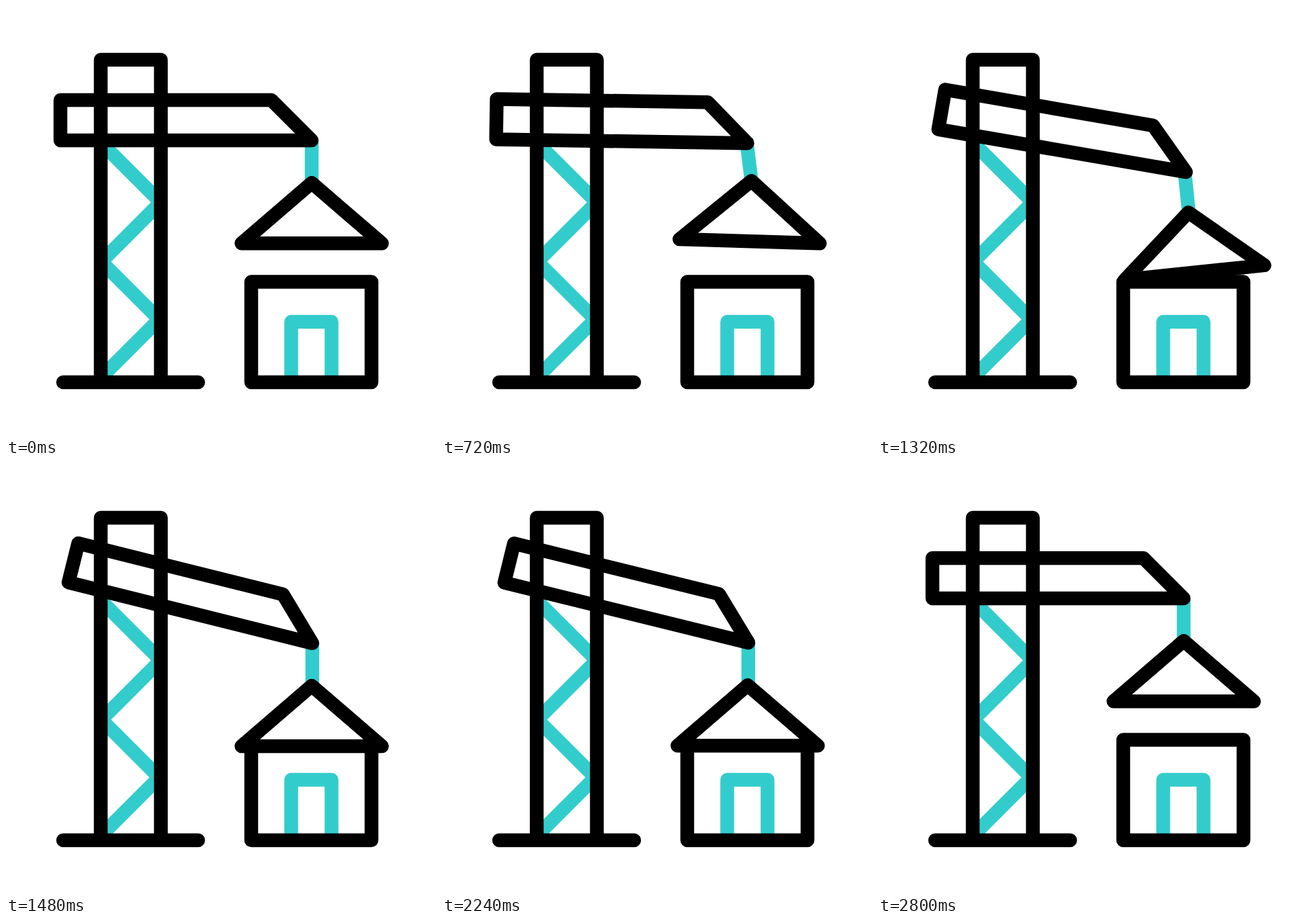
These frames come from a looping animation (640x640 px, 3000 ms). An HTML page:

```html
<!DOCTYPE html>
<html lang="en">
<head>
<meta charset="utf-8">
<title>Crane</title>
<style>
  html, body { margin: 0; height: 100%; overflow: hidden; background: #fff; }
  svg { display: block; width: 100%; height: 100%; }
  path { fill: none; stroke: #000; stroke-width: 20.5; stroke-linejoin: round; stroke-linecap: round; }
  .teal { stroke: #33cccc; stroke-linecap: butt; }
  #roof { fill: #fff; }
</style>
</head>
<body>
<svg viewBox="0 0 640 640">
  <path class="teal" d="M138 200L230.2 292.2L142 380.4L228 466.4L138 556.4"/>
  <path class="teal" id="rope" d="M0 0V-63"/>
  <g id="house">
    <path class="teal" d="M424.5 560V470H484.5V560"/>
    <path d="M365 410.5H544V560H365Z"/>
  </g>
  <path d="M141 560V80H230.5V560M85 560H286"/>
  <path id="jib" d="M81 140H395L455 200H81Z"/>
  <path id="roof" d="M0 0L104.5 90H-104.5Z"/>
</svg>
<script>
const LOOP = 3000, STEP = 40;

// jib: tilt, slide: shift of the jib, x and y: roof apex, roof and rope: swing
const rest = { jib: 0, slide: 0, x: 455, y: 263.3, roof: 0, rope: 0 };
const dip = { jib: 3.2, slide: 0, x: 448.7, y: 273.5, roof: 15, rope: 2 };
const lift = { jib: -3.8, slide: 0, x: 484.3, y: 233.6, roof: -25, rope: -25 };
const landed = { ...rest, jib: 14, slide: 16.3, y: 330 };

const moves = [
  { from: rest, to: dip, start: 120, end: 553 },
  { from: dip, to: lift, start: 553, end: 985 },
  { from: lift, to: landed, start: 985, end: 1475 },
  { from: landed, to: rest, start: 2200, end: 2800 }
];

const progress = (t, start, end) => Math.min(1, Math.max(0, (t - start) / (end - start)));
const ease = s => s * s * (3 - 2 * s);

function poseAt(t) {
  const { from, to, start, end } = moves.findLast(m => t >= m.start) || moves[0];
  const k = ease(progress(t, start, end));
  const pose = {};
  for (const name in from) pose[name] = from[name] + (to[name] - from[name]) * k;
  return pose;
}

function place(id, transform) {
  document.getElementById(id).setAttribute("transform", transform);
}

function draw(t) {
  const p = poseAt(t);
  // the house gives slightly under the landing roof
  const squash = 1 - 0.012 * Math.sin(Math.PI * progress(t, 1475, 1720));
  place("jib", `translate(${p.slide} ${p.slide / 12}) rotate(${p.jib} 181 170)`);
  place("rope", `translate(${p.x + p.slide / 18} ${p.y}) rotate(${p.rope})`);
  place("roof", `translate(${p.x} ${p.y}) rotate(${p.roof})`);
  place("house", `translate(0 560) scale(1 ${squash}) translate(0 -560)`);
}

const begin = performance.now();
function tick() {
  const t = (performance.now() - begin) % LOOP;
  draw(Math.floor(t / STEP) * STEP);
  requestAnimationFrame(tick);
}
tick();
</script>
</body>
</html>
```
